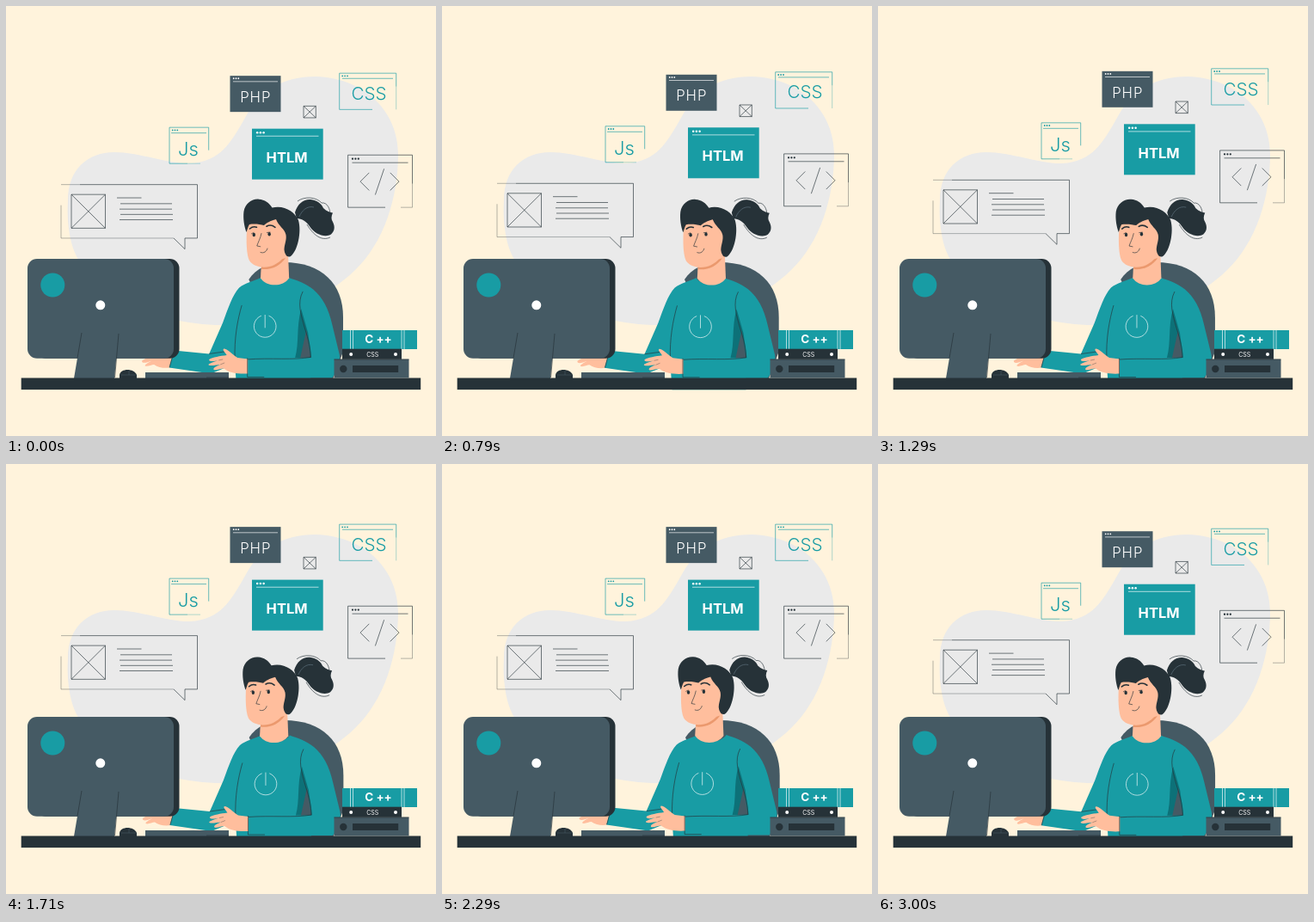
Write an HTML page that moves like this. It is 500x500 px and loops after 3040 ms.

```html
<!DOCTYPE html>
<html lang="en">
<head>
<meta charset="utf-8">
<title>At the desk</title>
<style>
  html, body { margin: 0; width: 100%; height: 100%; overflow: hidden; background: #fff3dc; }
  svg { display: block; width: 100vw; height: 100vh; }
  text { font-family: Inter, "Open Sans", sans-serif; text-anchor: middle; }
  .dark { fill: #263238; }
  .slate { fill: #455a64; }
  .teal { fill: #189ca4; }
  .shade { fill: #0d7178; }
  .skin { fill: #ffbe9d; }
  .white { fill: #fff; }
  .line { fill: none; stroke: #263238; stroke-width: .65; }
  .fine { stroke-width: .35; }
  .bold { stroke-width: 1.6; }
  .tealLine { stroke: #189ca4; }
  .whiteLine { stroke: #fff; }
  .greyLine { stroke: #607580; }
  .round { stroke-linecap: round; stroke-linejoin: round; }
</style>
</head>
<body>
<svg viewBox="0 0 500 500">
  <rect width="500" height="500" fill="#fff3dc"/>
  <path fill="#eaeaea" d="M72 226C72 190 95 170 126 170C155 170 190 184 214 183C250 181 262 158 278 130C295 98 322 82 360 82C420 84 456 125 456 172C456 222 440 275 405 308C380 332 320 370 255 371C170 372 90 330 76 275C72 258 71 242 72 226Z"/>

  <g id="windows">
    <!-- speech bubble -->
    <path class="line" d="M86 208H222.5V270.3H208V283L195 270.3"/>
    <path class="line fine" d="M64 208H86M195 270.3H64V232"/>
    <path class="line" d="M76 219.5H115.5V258.7H76ZM76 219.5L115.5 258.7M115.5 219.5L76 258.7"/>
    <path class="line" d="M129 223.4H157.5M133 230.2H193M132 236.5H193M133 242.7H194M132 248.9H194"/>

    <rect class="slate" x="260.5" y="81.5" width="59" height="42"/>
    <path class="line whiteLine" d="M264 88.2H316"/>
    <g class="white" data-dots="264.7 84.6 2.8 .9"></g>
    <text class="white" x="290.3" y="112.2" font-size="16.8" font-weight="300" letter-spacing=".9">PHP</text>

    <path class="line" d="M346 116.7H360.3V130.3H346ZM346 116.7L360.3 130.3M360.3 116.7L346 130.3"/>

    <path class="line tealLine" d="M426 120.7H387.7V78.5H453.7V94M391 84.6H450"/>
    <path class="line tealLine fine" d="M453.7 94V120.7"/>
    <g class="teal" data-dots="391.2 81.7 2.9 .9"></g>
    <text class="teal" x="422" y="109.2" font-size="20.6" font-weight="300">CSS</text>

    <path class="line tealLine" d="M211 183.5H190V141.5H235.7V168M192 148H233"/>
    <path class="line tealLine fine" d="M211 183.5H226"/>
    <g class="teal" data-dots="193.7 144.7 2.8 .9"></g>
    <text class="teal" x="212" y="174.7" font-size="22" font-weight="300">Js</text>

    <rect class="teal" x="286" y="143" width="82.7" height="59"/>
    <path class="line whiteLine" d="M291 151.6H363.5"/>
    <g class="white" data-dots="292.2 147.5 3.7 1.25"></g>
    <text class="white" x="326.6" y="182.2" font-size="16.5" font-weight="700">HTLM</text>

    <path class="line" d="M441 234.5H397.6V173.6H472.5V207M402.5 182.5H467.5"/>
    <path class="line fine" d="M472.5 207V234.5H459"/>
    <g class="dark" data-dots="403 178 3.4 1.15"></g>
    <path class="line round" d="M422 194.5L412 204.5L422 214.5M439.5 190L429.5 219.5M447 194.5L457 204.5L447 214.5"/>
  </g>

  <path id="chair" class="slate" d="M282 318C290 305 306 298 323 298C367 298 391.7 323 391.7 362V402L380 433H335Z"/>

  <g id="body">
    <!-- far hand -->
    <path class="skin" d="M194 404L176 402C170 407 163 409 158 412.5C157 415.5 162 416 169 412.5C165 415 161 417 161.5 418.5C164 420 169 417 172 417C177 421 185 421.5 191 420.5Z"/>
    <path class="teal" d="M296 316C287 320 278 322 271 327.5C263 336 258 352 252 368L236 404.5L195 400.5L189.5 420.5L238 427.5L266 416L268 446H354V432.5L379 432.5C386 424 389 414 387.5 405L379 370C375 352 368 339 357 329.5C348 322 337 319 329 316C322 326 303 326 296 316Z"/>
    <path class="shade" d="M343 352C337 375 341 391 336 409H355L351 380Z"/>
    <path class="slate" d="M349 377L342 409L354 408.5Z"/>
    <path class="line" d="M345 332C338 345 343 360 347 374C352 390 354 398 354 408.5C335 412 307 409 280 411"/>
    <path class="line" d="M274 348C269 365 265 387 266 411M236 404.5L254 402M195 402L190 420"/>
    <path class="skin" d="M281 410.5L269 409C263 405 257 398.5 253 398.5C251 400 255 403 256.5 406C249 407 240 408.5 236 411C235 413.5 241 413.5 247 412C241 414 234 416 235.5 417.5C238 419 245 417 249 417C244 419 240 421 241.5 423C245 424 249 421.5 253 421.5C260 427 270 428 281 427.5Z"/>
    <path class="line fine" d="M247 412L252 411M249 417L254 415"/>
    <path class="line" d="M280.5 409.5V431.5H300"/>
    <path class="line whiteLine round" d="M296.3 360.4A12.9 12.9 0 1 0 305.7 360.4M301 359.5V374"/>
  </g>

  <g id="head">
    <path class="skin" d="M297 298L296 316.5C303 327 322 327 329.2 316.5L328 287Z"/>
    <path fill="#eb996e" d="M297 302L297 306C309 307 319 302 325 293Z"/>
    <path class="skin" d="M281 248C279 267 279 288 283 296C288 304 302 306 312 301C320 297 326 290 327 280L327 247Z"/>
    <path class="dark" d="M279.5 263C277 256 275.5 247 276.5 239C278 230 286 224 294 224.7C301 225 306 229 309.5 234.5C323 231 336 239 340 249C344 263 339 285 331 291C327 293 324 289 323.5 283C324 276 326.5 272 325.5 266C324 259 317 256 314 248C307 250 303 252 300 255C296 254 289 253 283 254C281 257 280.5 261 279.5 263Z"/>
    <path class="dark" d="M336 240C339 230 346 224.5 354 225C362 226 367 230 369 235C373 239 377 240 380 240.5C378 245 378 248 380 251C383 257 382 262 378 265.5C371 270 359 265 354 257.5C350 251 344 247 338 247Z"/>
    <path class="line" d="M339 227C347 221 361 222 367 229C374 228 377 237 377 242M350 254C357 266 367 274 377 269"/>
    <path class="line greyLine" d="M341 245C344 238 350 232 358 234"/>
    <ellipse class="dark" cx="288.3" cy="266" rx="1.7" ry="2.2"/>
    <ellipse class="dark" cx="306.2" cy="265.2" rx="1.7" ry="2.2"/>
    <path class="line bold round" d="M283.5 259C286 256.8 289 256.3 291.5 257.3M303 256.3C306 254.5 310 255 313 257.3"/>
    <path class="line round" d="M297 264.5C296 270 293 275 291.8 279L295.8 279.8M296 286.5C300 288 303 285.5 304 282M285.5 264.8L288 263.5M303.5 263.5L307 263"/>
  </g>

  <!-- monitor -->
  <rect class="dark" x="35" y="294" width="166.5" height="115.7" rx="11"/>
  <rect class="slate" x="25" y="294" width="170" height="115.7" rx="11"/>
  <path class="slate" d="M88 380H131L126 433H79Z"/>
  <path class="line" d="M88 380L83 409.5M131 381L126.5 432"/>
  <circle class="white" cx="109.8" cy="347.8" r="5.5"/>
  <circle class="teal" cx="54.3" cy="324.5" r="14"/>

  <path class="dark" d="M132 433V429C133 421 149 421 152 429V433Z"/>
  <path class="line fine greyLine" d="M134 429H151M143 424V429"/>
  <rect class="slate" x="162" y="426" width="97" height="7"/>
  <path class="line" d="M233 432H259"/>
  <rect class="dark" x="17.7" y="432.5" width="464.5" height="13.6"/>

  <!-- books -->
  <rect class="slate" x="381.5" y="410.7" width="87" height="21.8"/>
  <path class="line" d="M381.5 411H468.5"/>
  <circle class="dark" cx="392.3" cy="422" r="4.2"/>
  <rect class="dark" x="403" y="418" width="53.2" height="8"/>
  <rect class="dark" x="391" y="399" width="69" height="11.8"/>
  <circle class="white" cx="401.2" cy="405" r="2"/>
  <circle class="white" cx="453" cy="405" r="2"/>
  <text class="white" x="426.2" y="407.6" font-size="7">CSS</text>
  <rect class="teal" x="391" y="377" width="87" height="22"/>
  <path class="line whiteLine" d="M400.5 377V399M403.5 377V399M460 377V399M463 377V399"/>
  <path class="line" d="M391 399H460"/>
  <text class="white" x="433" y="392" font-size="13.5" font-weight="700">C ++</text>
</svg>
<script>
const LOOP = 3040;
const TAU = Math.PI * 2;
const [windows, chair, body, head] =
  ["windows", "chair", "body", "head"].map(id => document.getElementById(id));

// Three title-bar dots: x, y, gap, radius
for (const group of document.querySelectorAll("[data-dots]")) {
  const [x, y, gap, r] = group.dataset.dots.split(" ").map(Number);
  for (let i = 0; i < 3; i++) {
    const dot = document.createElementNS("http://www.w3.org/2000/svg", "circle");
    dot.setAttribute("cx", x + i * gap);
    dot.setAttribute("cy", y);
    dot.setAttribute("r", r);
    group.append(dot);
  }
}

function shift(el, x, y) {
  el.setAttribute("transform", `translate(${x.toFixed(3)} ${y.toFixed(3)})`);
}

function draw(t) {
  // The windows drift on a longer wave, so they jump back when the loop restarts
  shift(windows, 0, -4.4 + 4.6 * Math.cos(TAU * (t - 270) / 3460));
  const sway = Math.pow(.5 - .5 * Math.cos(TAU * (t - 700) / LOOP), 1.4);
  shift(chair, sway, 0);
  shift(body, -.5 + 2.2 * sway, .3 - 1.2 * sway);
  shift(head, .8 - 2.6 * sway, .2 - .7 * sway);
}

const start = performance.now();
function tick(now) {
  draw(Math.max(0, now - start) % LOOP);
  requestAnimationFrame(tick);
}
draw(0);
requestAnimationFrame(tick);
</script>
</body>
</html>
```
